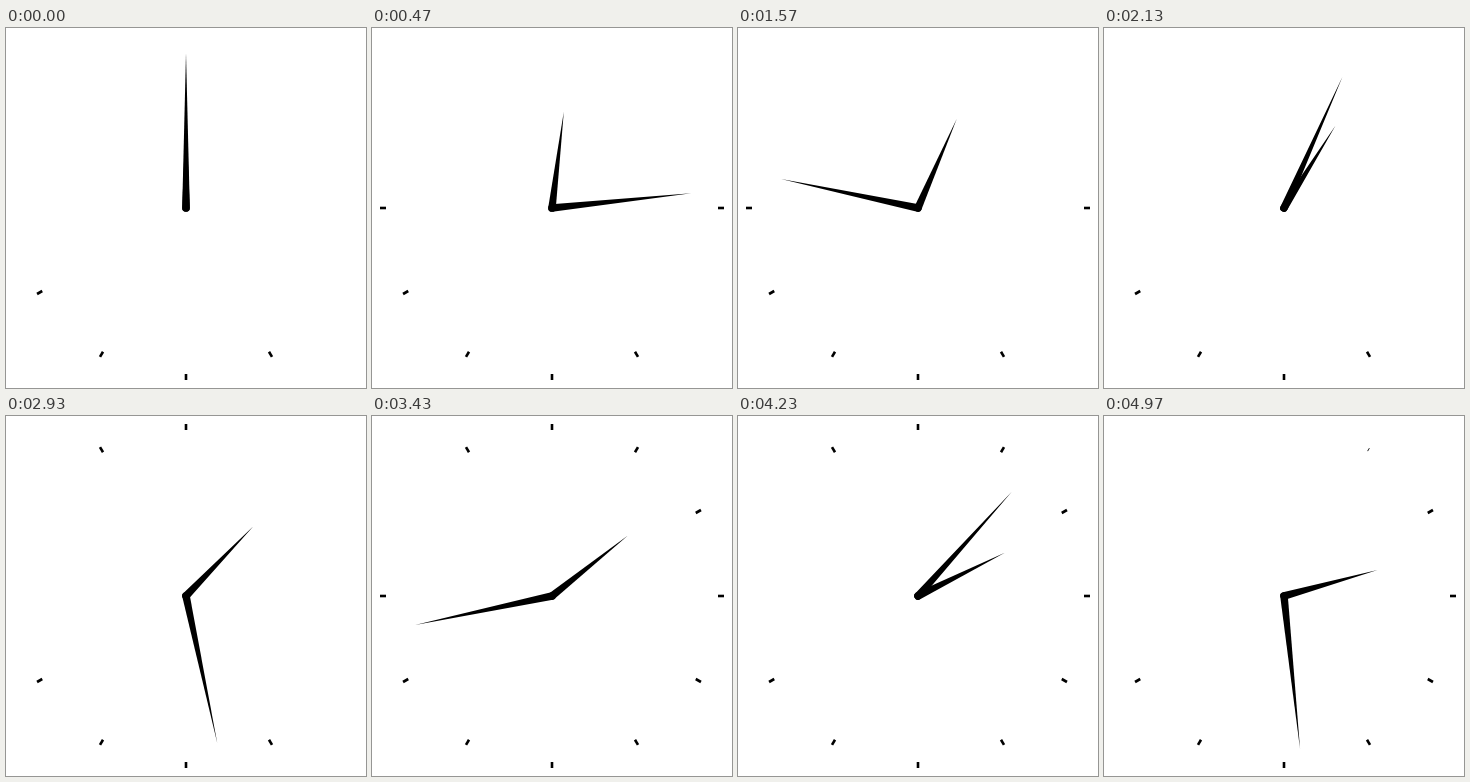
Write an HTML page with a canvas that moves like this. It is 360 px wide and 360 px high and loops after 5 s.

```html
<!DOCTYPE html>
<html lang="en">
<head>
<meta charset="utf-8">
<title>Clock</title>
<style>
html, body { margin: 0; width: 100%; height: 100%; overflow: hidden; background: #fff; }
canvas { display: block; width: 360px; height: 360px; }
</style>
</head>
<body>
<canvas id="stage" width="360" height="360"></canvas>
<script>
const ctx = document.getElementById('stage').getContext('2d');
const LOOP = 5000;
const STEP = 100 / 3; // one clock minute
const FADE = 3;

// 0 outside the span, 1 inside, with a short ramp at both ends
function within(value, from, to) {
  return Math.max(0, Math.min(1, (value - from) / FADE, (to - value) / FADE));
}

// Lower marks stay, side marks blink every half hour,
// and the marks from 11 to 4 come and go one after another
function markSize(hour, minute) {
  if (hour >= 5 && hour <= 8) return 1;
  const blink = hour % 6 === 3 ? within(minute % 30, 9, 22) : 0;
  const order = (hour + 1) % 12;
  const sweep = order < 6 ? within(minute, 80 + 4 * order, 131 + 9.5 * order) : 0;
  return Math.max(blink, sweep);
}

function turned(degrees, paint) {
  ctx.save();
  ctx.translate(180, 180);
  ctx.rotate(degrees * Math.PI / 180);
  paint();
  ctx.restore();
}

function drawMark(hour, size) {
  const w = 2.6 * size, h = 6 * Math.sqrt(size);
  turned(hour * 30, () => ctx.fillRect(-w / 2, -169 - h / 2, w, h));
}

function drawHand(degrees, length) {
  const r = 3.8;
  turned(degrees, () => {
    ctx.beginPath();
    ctx.moveTo(-r, 0);
    ctx.lineTo(0, -length);
    ctx.lineTo(r, 0);
    ctx.arc(0, 0, r, 0, Math.PI);
    ctx.fill();
  });
}

function draw(time) {
  const tens = Math.floor((time % LOOP) / 10) * 10;
  const minute = Math.floor((tens + 5) / STEP);
  ctx.fillStyle = '#fff';
  ctx.fillRect(0, 0, 360, 360);
  ctx.fillStyle = '#000';
  for (let hour = 0; hour < 12; hour++) drawMark(hour, markSize(hour, minute));

  // The fine tip reaches further when the hand is upright
  const upright = Math.cos(minute * Math.PI / 30) ** 16;
  drawHand(minute / 2, 97);
  drawHand(minute * 6, 140 + 15 * upright);
}

let start;
function tick(now) {
  if (start === undefined) start = now;
  draw(now - start);
  requestAnimationFrame(tick);
}
draw(0);
requestAnimationFrame(tick);
</script>
</body>
</html>
```
